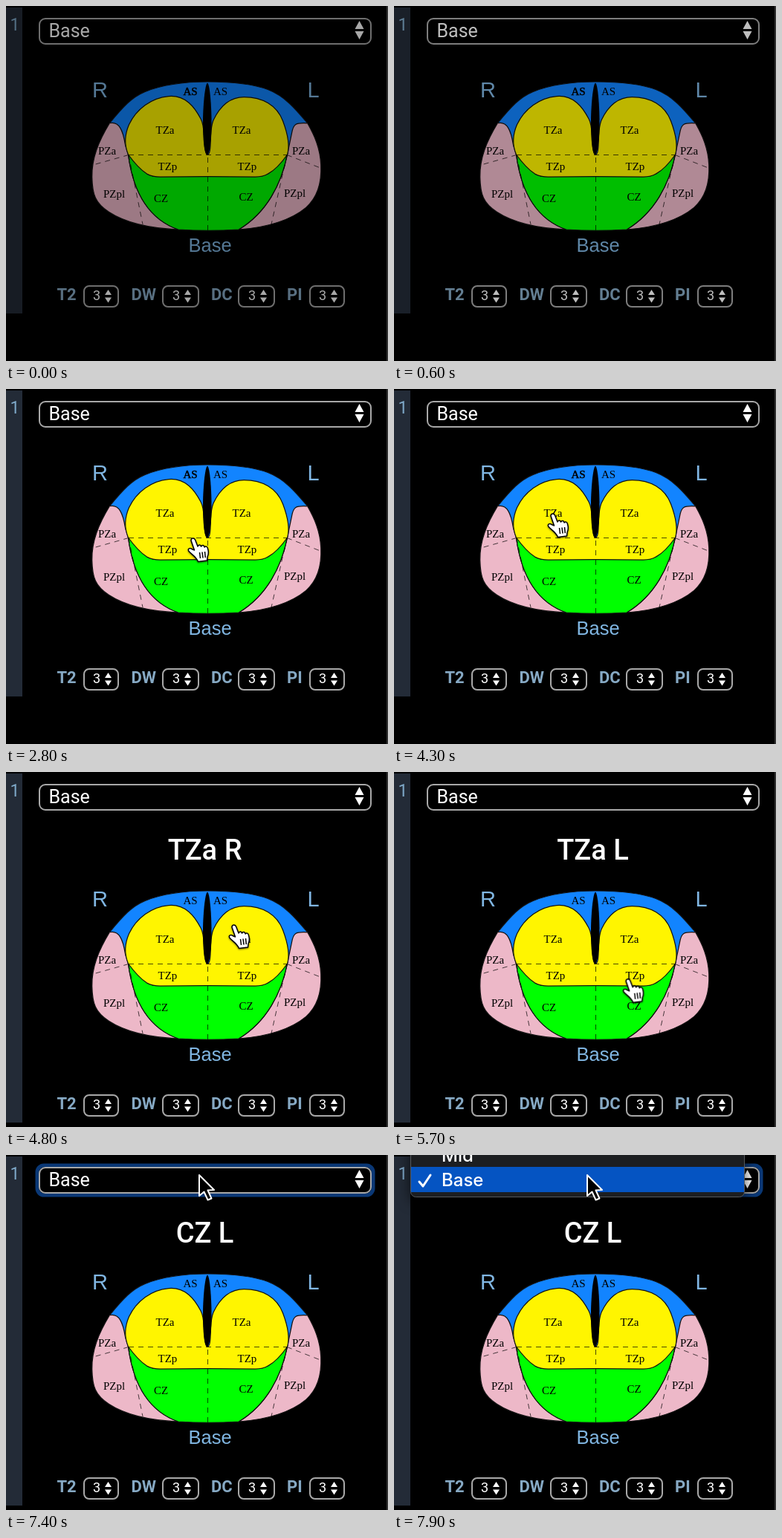
An HTML page for the animation above (8 s loop, 514 by 478 pixels).

```html
<!DOCTYPE html>
<html lang="en">
<head>
<meta charset="utf-8">
<title>Sector map</title>
<style>
html, body { margin: 0; width: 100%; height: 100%; overflow: hidden; background: #000; }
svg { display: block; width: 514px; height: 478px; font-family: Roboto, sans-serif; }

.ui, .bar, .panel, .title, .popup, .ring, .cursor, .hand, .arrow, .heavy {
  animation: 8s step-end infinite;
}
.ui { animation-name: dim; }
.bar { animation-name: grow; }
.panel { animation-name: drop; }
.cursor { animation-name: travel; }
.hand { animation-name: hand; }
.arrow { animation-name: arrow; }
.ring { animation-name: ring; }
.popup { animation-name: popup; }
.heavy { animation-name: heavy; }
.t1 { animation-name: first; }
.t2 { animation-name: second; }
.t3 { animation-name: third; }

@keyframes dim {
  0% { opacity: .66; }
  1.25% { opacity: .64; }
  2.5% { opacity: .62; }
  5% { opacity: .62; animation-timing-function: steps(6); }
  12.5%, 100% { opacity: 1; }
}
@keyframes grow { 0% { height: 412px; } 55%, 100% { height: 470px; } }
@keyframes drop { 0% { transform: none; } 55%, 100% { transform: translateY(58px); } }
@keyframes heavy { 0% { stroke-width: .5px; } 55%, 100% { stroke-width: 0; } }
@keyframes first { 0% { opacity: 0; } 55% { opacity: 1; } 65%, 100% { opacity: 0; } }
@keyframes second { 0% { opacity: 0; } 65% { opacity: 1; } 77.5%, 100% { opacity: 0; } }
@keyframes third { 0% { opacity: 0; } 77.5%, 100% { opacity: 1; } }
@keyframes hand { 0% { opacity: 0; } 8.75% { opacity: 1; } 88.75%, 100% { opacity: 0; } }
@keyframes arrow { 0% { opacity: 0; } 88.75%, 100% { opacity: 1; } }
@keyframes ring { 0% { opacity: 0; } 92.5%, 100% { opacity: 1; } }
@keyframes popup { 0% { opacity: 0; } 93.75%, 100% { opacity: 1; } }
@keyframes travel {
  0% { transform: translate(8px, 402px); }
  8.75% { transform: translate(8px, 402px); animation-timing-function: steps(3); }
  12.5% { transform: translate(103px, 131px); }
  18.75% { transform: translate(97px, 134px); animation-timing-function: steps(2); }
  21.25% { transform: translate(78px, 137px); }
  28.75% { transform: translate(78px, 137px); animation-timing-function: steps(5); }
  35% { transform: translate(252px, 203px); animation-timing-function: steps(4); }
  40% { transform: translate(207px, 172px); animation-timing-function: steps(2); }
  42.5% { transform: translate(214px, 170px); }
  55% { transform: translate(214px, 170px); animation-timing-function: steps(4); }
  60% { transform: translate(307px, 208px); animation-timing-function: steps(3); }
  63.75% { transform: translate(311px, 213px); }
  67.5% { transform: translate(311px, 213px); animation-timing-function: steps(5); }
  73.75% { transform: translate(318px, 326px); }
  80% { transform: translate(318px, 326px); animation-timing-function: steps(3); }
  83.75% { transform: translate(236px, 340px); }
  85% { transform: translate(228px, 358px); animation-timing-function: steps(4); }
  90%, 100% { transform: translate(260px, 27px); }
}

.box { fill: none; stroke: #a8a8a8; stroke-width: 2; }
.label { font-size: 22px; font-weight: 700; fill: #86a9c4; }
.num { font-size: 18px; fill: #fff; }
.side { font-family: "Liberation Sans", Arial, sans-serif; fill: #80b6e2; }
.map { transform: scale(1.005); transform-origin: 270px 202px; }
.zone { stroke: #111; stroke-width: 1.2; }
.zones { font: 15px "Liberation Serif", Times, serif; }
.heavy { stroke: #000; }
.dash { fill: none; stroke: #000; stroke-opacity: .7; stroke-dasharray: 7 6; }
.title { font-size: 38px; font-weight: 500; fill: #fff; text-anchor: middle; }
.popup { filter: drop-shadow(0 5px 9px #000a); }
.popup text { font: 500 24px Inter, sans-serif; fill: #fff; }
.hand { filter: drop-shadow(0 1px 1px #0008); }
</style>
</head>
<body>
<svg viewBox="0 0 514 478">
  <defs>
    <g id="pick">
      <text class="num" x="13" y="20">3</text>
      <path fill="#fff" d="M29 13l4.500-7 4.500 7zM29 16.500h9l-4.500 7z"/>
    </g>
  </defs>

  <path d="M513 0v478" stroke="#303030" stroke-width="2"/>

  <g class="ui">
    <rect class="bar" y="2" width="22" height="412" fill="#232b37"/>
    <text x="5.500" y="33" font-size="23" fill="#7fa9c9">1</text>

    <rect class="ring" x="42" y="14" width="452" height="40" rx="9" fill="none" stroke="#0a3876" stroke-width="5"/>
    <rect class="box" x="45" y="17" width="446" height="34" rx="8"/>
    <text x="57.500" y="42" font-size="25" fill="#fff">Base</text>
    <path fill="#fff" d="M469.500 31l6-11 6 11zM469.500 34h12l-6 11z"/>

    <text class="title t1" x="267.500" y="118">TZa R</text>
    <text class="title t2" x="267.500" y="118">TZa L</text>
    <text class="title t3" x="267.500" y="118">CZ L</text>

    <g class="panel">
      <g class="side">
        <text x="116" y="123" font-size="29">R</text>
        <text x="405.500" y="123" font-size="29">L</text>
        <text x="245.500" y="330.500" font-size="25.500">Base</text>
      </g>

      <g class="map">
        <path class="zone" fill="#1284ff" d="M140 158C158 136 170 123 187 116C212 106 240 102.500 271 102.500C302 102.500 331 105 352 113C375 122 389 139 405 158L378 200H165Z"/>
        <path class="zone" fill="#edb8c8" d="M140 158C153 155 158 168 161 187L165 200C170 238 185 284 232 300.500C196 299 162 292 139 277C121 265 117 254 116.500 230C116 205 125 183 140 158Z"/>
        <path class="zone" fill="#edb8c8" d="M405 158C389 157 386 159 384 171L378 200C370 240 350 278 313 300.500C352 298 384 287 403 271C419 257 424 236 423 214C422 191 414 174 405 158Z"/>
        <path class="zone" fill="#0f0" d="M165 200C170 238 185 284 232 300.500Q272 303 313 300.500C350 278 370 240 378 200L344 229H198Z"/>
        <path class="zone" fill="#fff500" d="M165 200C159 186 160 174 166 160C176 139 196 124 219 122C242 120 254 137 262 152C267 161 266 172 267 184Q268 200 271 200Q275 200 275 184C276 172 275 164 279 154C288 135 302 123 320 123C345 123 364 134 372 155C378 171 382 187 378 200C369 213 361 221 352 226Q346 230 335 230Q271 229 208 230Q197 230 190 226C181 220 173 211 165 200Z"/>
        <path d="M271 104C274.500 106 276.500 137 276.500 157C276.500 182 274 200 270.500 200C267 200 265 181 265 157C265 137 267.500 106 271 104Z"/>
      </g>
      <path class="dash" d="M165 200.500H378M271.500 204V302M165 200.500L117 214M378 200.500L423 218M165 200.500L184 294M378 200.500L357 294"/>

      <g class="zones">
        <text class="heavy" x="238.500" y="120">AS</text>
        <text x="279" y="120">AS</text>
        <text x="201.500" y="172">TZa</text>
        <text x="304.500" y="172">TZa</text>
        <text x="204.500" y="221">TZp</text>
        <text x="311.500" y="221">TZp</text>
        <text x="199" y="264">CZ</text>
        <text x="313.500" y="262">CZ</text>
        <text x="124" y="200">PZa</text>
        <text x="385" y="200">PZa</text>
        <text x="131" y="258">PZpl</text>
        <text x="374" y="257">PZpl</text>
      </g>

      <g class="label">
        <text x="68.500" y="396">T2</text>
        <text x="168.500" y="396">DW</text>
        <text x="276" y="396">DC</text>
        <text x="378" y="396">PI</text>
      </g>
      <rect class="box" x="105" y="377" width="46" height="28" rx="7"/>
      <rect class="box" x="211" y="377" width="48" height="28" rx="7"/>
      <rect class="box" x="313" y="377" width="48" height="28" rx="7"/>
      <rect class="box" x="409" y="377" width="46" height="28" rx="7"/>
      <use href="#pick" x="104" y="376"/>
      <use href="#pick" x="211" y="376"/>
      <use href="#pick" x="313" y="376"/>
      <use href="#pick" x="408" y="376"/>
    </g>
  </g>

  <g class="popup">
    <rect x="22.500" y="-20" width="449" height="76.500" rx="7" fill="#1c1e21" stroke="#55585c"/>
    <rect x="23" y="16" width="448" height="34" fill="#0554c2"/>
    <path d="M34 36l5 6 10-15" fill="none" stroke="#fff" stroke-width="3" stroke-linecap="round" stroke-linejoin="round"/>
    <text x="64" y="8.500">Mid</text>
    <text x="64" y="42">Base</text>
  </g>

  <g class="cursor">
    <g class="hand" stroke="#000" stroke-width="1.500" stroke-linejoin="round">
      <path fill="#fff" d="M-3 1C-3-2.500 1-3 2.500 0L6 9C7 6 10 6.500 10.500 9C12 6.500 14.500 7 15 10C16.500 8 19 9 19.500 12C21 17 20.500 20 19 23L18.500 28L6.500 29.500C4 23-2 20-6 15.500C-8 12-4.500 10.500-2 12.500L1.500 14Z"/>
      <path fill="none" d="M8.500 17l1 8M12 16.500l1 8M15.500 16l.8 8"/>
    </g>
    <path class="arrow" d="M0 0V28L6.500 22.500L11.500 33.500L16.500 31.500L11.500 20.500L20 20Z" stroke="#fff" stroke-width="2" stroke-linejoin="round"/>
  </g>
</svg>
</body>
</html>
```
